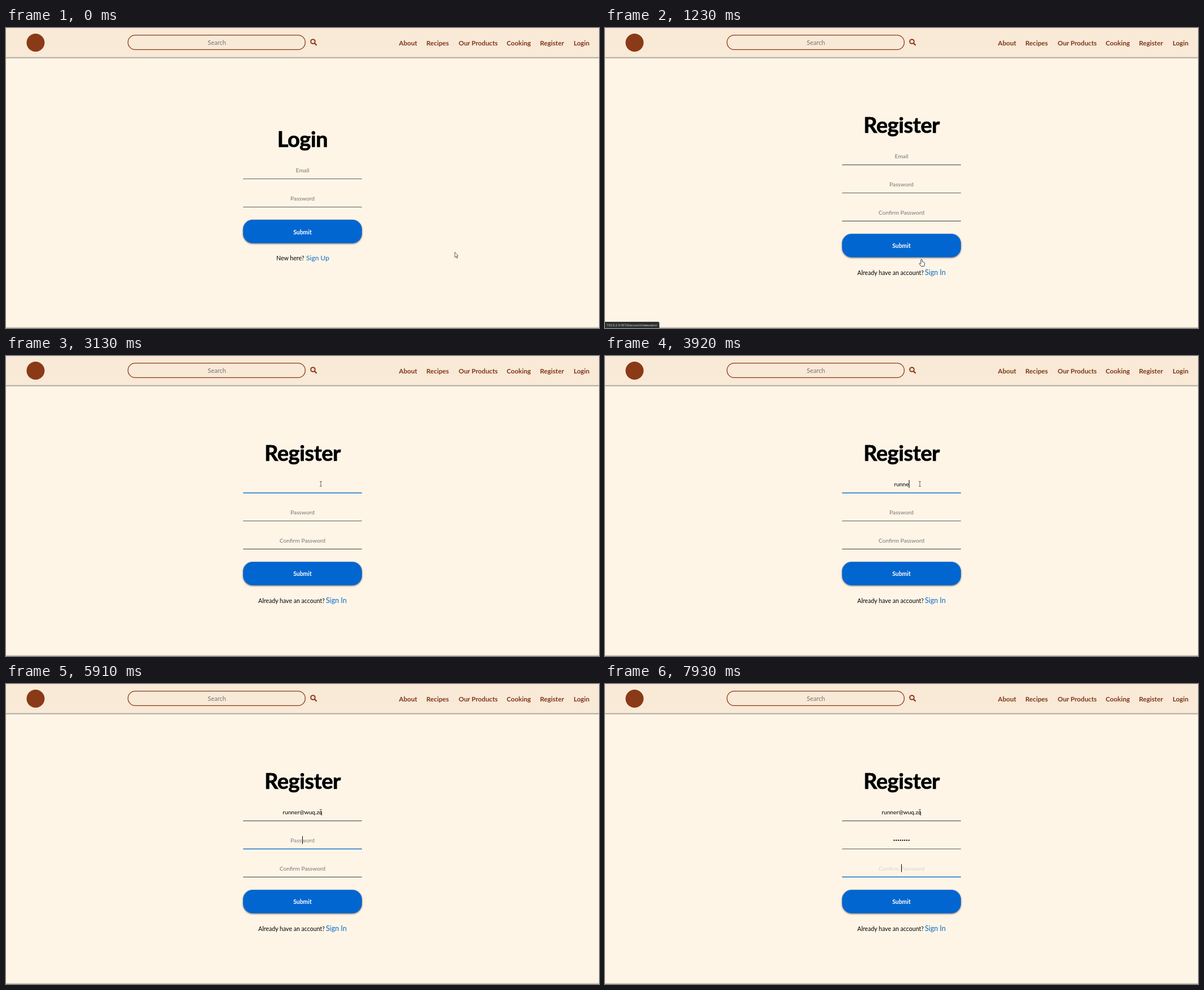
These frames come from a looping animation (1053 px wide and 532 px high, 8 s). An HTML page:

```html
<!DOCTYPE html>
<html lang="en">
<head>
<meta charset="utf-8">
<title>Login and register</title>
<style>
  html, body { margin: 0; width: 100%; height: 100%; overflow: hidden; background: #fef5e7; }
  svg { display: block; width: 1053px; height: 532px; font: 10.2px Lato, "Open Sans", sans-serif; }
  text { text-anchor: middle; }
  .nav { font-weight: 700; font-size: 11.7px; fill: #7c3518; }
  .hint { fill: #757575; }
  .title { font-weight: 700; font-size: 38px; letter-spacing: -.4px; stroke: #000; stroke-width: .7px; }
  .line { stroke: #5c5c5c; stroke-width: 1.2px; }
  .line.on { stroke: #1673cc; stroke-width: 1.5px; }
  .button rect { fill: #0266d0; filter: drop-shadow(0 1.5px 1.5px rgba(0, 0, 0, .6)); }
  .button text { fill: #fff; font-weight: 700; font-size: 10.4px; }
  .note { font-size: 10.6px; text-anchor: start; }
  .link { font-size: 12.1px; text-anchor: start; fill: #0b6bc7; }
  .dots { font-size: 6.5px; }
  .header { filter: drop-shadow(0 1px 1px rgba(0, 0, 0, .55)); }

  #login, #register, #status, #cursor, #cursor > *, #underline { animation: 8s infinite step-end; }
  #login { animation-name: leave; }
  #register { animation-name: enter; }
  #underline { animation-name: underline; }
  #status { animation-name: status; animation-timing-function: linear; }
  #status text { font: 5.6px "Open Sans", sans-serif; text-anchor: start; fill: #e4e4e4; }
  #cursor { animation-name: move; animation-timing-function: linear; }
  #cursor > .arrow { animation-name: arrow; }
  #cursor > .hand { animation-name: hand; }
  #cursor > .beam { animation-name: beam; }

  @keyframes leave { 0% { visibility: visible } 14.5%, 100% { visibility: hidden } }
  @keyframes enter { 0% { visibility: hidden } 14.5%, 100% { visibility: visible } }
  @keyframes underline { 0% { opacity: 0 } 10% { opacity: 1 } 14.5%, 100% { opacity: 0 } }
  @keyframes status { 0%, 10.1% { opacity: 0 } 12%, 18.8% { opacity: 1 } 20.5%, 100% { opacity: 0 } }
  @keyframes arrow { 0% { opacity: 1 } 10% { opacity: 0 } 18.9% { opacity: 1 } 25.6%, 100% { opacity: 0 } }
  @keyframes hand { 0% { opacity: 0 } 10% { opacity: 1 } 18.9%, 100% { opacity: 0 } }
  @keyframes beam { 0% { opacity: 0 } 25.6%, 100% { opacity: 1 } }
  @keyframes move {
    0%, 1.5% { transform: translate(797px, 397.5px); animation-timing-function: ease-in-out }
    10.8%, 18.5% { transform: translate(562px, 410px) }
    18.5% { animation-timing-function: ease-in }
    20.5% { transform: translate(640px, 409px) }
    22% { transform: translate(668px, 380px) }
    24.2% { transform: translate(652px, 300px) }
    26.2% { transform: translate(605px, 252px); animation-timing-function: ease-out }
    28%, 100% { transform: translate(559px, 227px) }
  }
</style>
</head>
<body>
<svg viewBox="0 0 1053 532">
  <rect width="1053" height="532" fill="#fef5e7"/>
  <rect y="530.4" width="1053" height="1.6" fill="#cbc4ba"/>

  <rect class="header" x="-5" y="-5" width="1063" height="56.8" fill="#f9e9d7"/>
  <circle cx="52.5" cy="26" r="16" fill="#8a3a17"/>
  <g fill="none" stroke="#8a3a17">
    <rect x="216.6" y="12.6" width="314.8" height="25.8" rx="12.9" stroke-width="1.3"/>
    <circle cx="545" cy="24" r="3.8" stroke-width="2"/>
    <path d="M548 27l3.6 3.6" stroke-width="2.3"/>
  </g>
  <text class="hint" x="374.5" y="30" font-size="11">Search</text>
  <g id="nav"></g>

  <g id="login">
    <text class="title" x="526.5" y="210.5">Login</text>
    <text class="hint" x="526.5" y="256">Email</text>
    <path class="line" d="M421 267.5h211"/>
    <text class="hint" x="526.5" y="305.5">Password</text>
    <path class="line" d="M421 317.5h211"/>
    <g class="button">
      <rect x="421" y="340" width="211" height="41.5" rx="17"/>
      <text x="526.5" y="365.5">Submit</text>
    </g>
    <text class="note" x="480" y="412">New here?</text>
    <text class="link" x="533" y="412">Sign Up</text>
    <path id="underline" d="M533 413.7h40" stroke="#0b6bc7"/>
  </g>

  <g id="register">
    <text class="title" x="526.5" y="186">Register</text>
    <g id="fields"></g>
    <path id="caret" d="M0 220v14" stroke="#000"/>
    <g class="button">
      <rect x="421" y="365" width="211" height="41.5" rx="17"/>
      <text x="526.5" y="390">Submit</text>
    </g>
    <text class="note" x="448" y="437.5">Already have an account?</text>
    <text class="link" x="568" y="437.5" style="font-size: 12.6px">Sign In</text>
  </g>

  <g id="status">
    <path d="M0 521h94q2.500 0 2.500 2.500v8.500h-96.500z" fill="#2d312e"/>
    <text x="3" y="529">192.0.2.5:4310/account/newusers/</text>
  </g>

  <g id="cursor" stroke-linejoin="round">
    <path class="arrow" d="M0 0V9.300L2.100 7.500 3.600 10.600 4.900 10 3.500 6.900H6Z" fill="#fff" stroke="#333" stroke-width=".8"/>
    <path class="hand" d="M-1.200 1Q0-1 1.200 1V4.600L4.800 5.700Q6 6.200 5.800 7.800L4.600 12.500H-.8L-4 8.200Q-4 6.600-2.600 7.200L-1.200 8.500Z" fill="#fff" stroke="#333" stroke-width=".9"/>
    <path class="beam" d="M-2-4.500H2M0-4.500V4M-2 4H2" fill="none" stroke="#555" stroke-width=".9"/>
  </g>
</svg>
<script>
  const LOOP = 8000, MID = 526.5, FADE = 170, BLINK = 500;
  const $ = id => document.getElementById(id);

  function add(parent, tag, attrs, content = '') {
    const el = document.createElementNS('http://www.w3.org/2000/svg', tag);
    for (const name in attrs) el.setAttribute(name, attrs[name]);
    el.textContent = content;
    return parent.appendChild(el);
  }

  const menu = { About: 714, Recipes: 766.5, 'Our Products': 838.5, Cooking: 910.5, Register: 969.5, Login: 1022 };
  for (const label in menu) add($('nav'), 'text', { class: 'nav', x: menu[label], y: 30.7 }, label);

  // Each field: label, focus and blur times, value, and the time of each key press.
  const fields = [
    { label: 'Email', focus: 2215, blur: 5885, value: 'runner@wuq.zq',
      keys: [3130, 3260, 3390, 3520, 3790, 3920, 4250, 4450, 4710, 4910, 5370, 5570, 5640] },
    { label: 'Password', focus: 5885, blur: 7790, value: '•'.repeat(8), dots: true,
      keys: [6320, 6450, 6660, 6790, 7060, 7260, 7460, 7590] },
    { label: 'Confirm Password', focus: 7790, blur: LOOP, value: '', keys: [] }
  ];

  fields.forEach((f, i) => {
    const y = i * 49.8, g = $('fields');
    f.y = y;
    f.hint = add(g, 'text', { class: 'hint', x: MID, y: 231 + y }, f.label);
    f.text = add(g, 'text', { class: f.dots ? 'dots' : '', x: MID, y: (f.dots ? 229.6 : 231) + y });
    f.line = add(g, 'path', { class: 'line', d: `M421 ${242.7 + y}h211` });
  });

  const caret = $('caret');
  const clock = $('cursor').getAnimations()[0];

  function draw(t) {
    caret.style.opacity = 0;
    for (const f of fields) {
      const typed = f.keys.filter(k => k <= t);
      const active = t >= f.focus && t < f.blur;
      const fade = Math.min(1, Math.max(0, 1 - (t - f.focus) / FADE));
      f.text.textContent = f.value.slice(0, typed.length);
      f.hint.style.opacity = typed.length ? 0 : fade;
      f.line.classList.toggle('on', active);
      if (!active) continue;
      const since = t - Math.max(f.focus, ...typed);
      const x = MID + (typed.length ? f.text.getComputedTextLength() / 2 + .5 : 0);
      caret.setAttribute('transform', `translate(${x} ${f.y})`);
      caret.style.opacity = since % (2 * BLINK) < BLINK ? 1 : 0;
    }
  }

  function tick() {
    draw((clock.currentTime || 0) % LOOP);
    requestAnimationFrame(tick);
  }
  tick();
</script>
</body>
</html>
```
